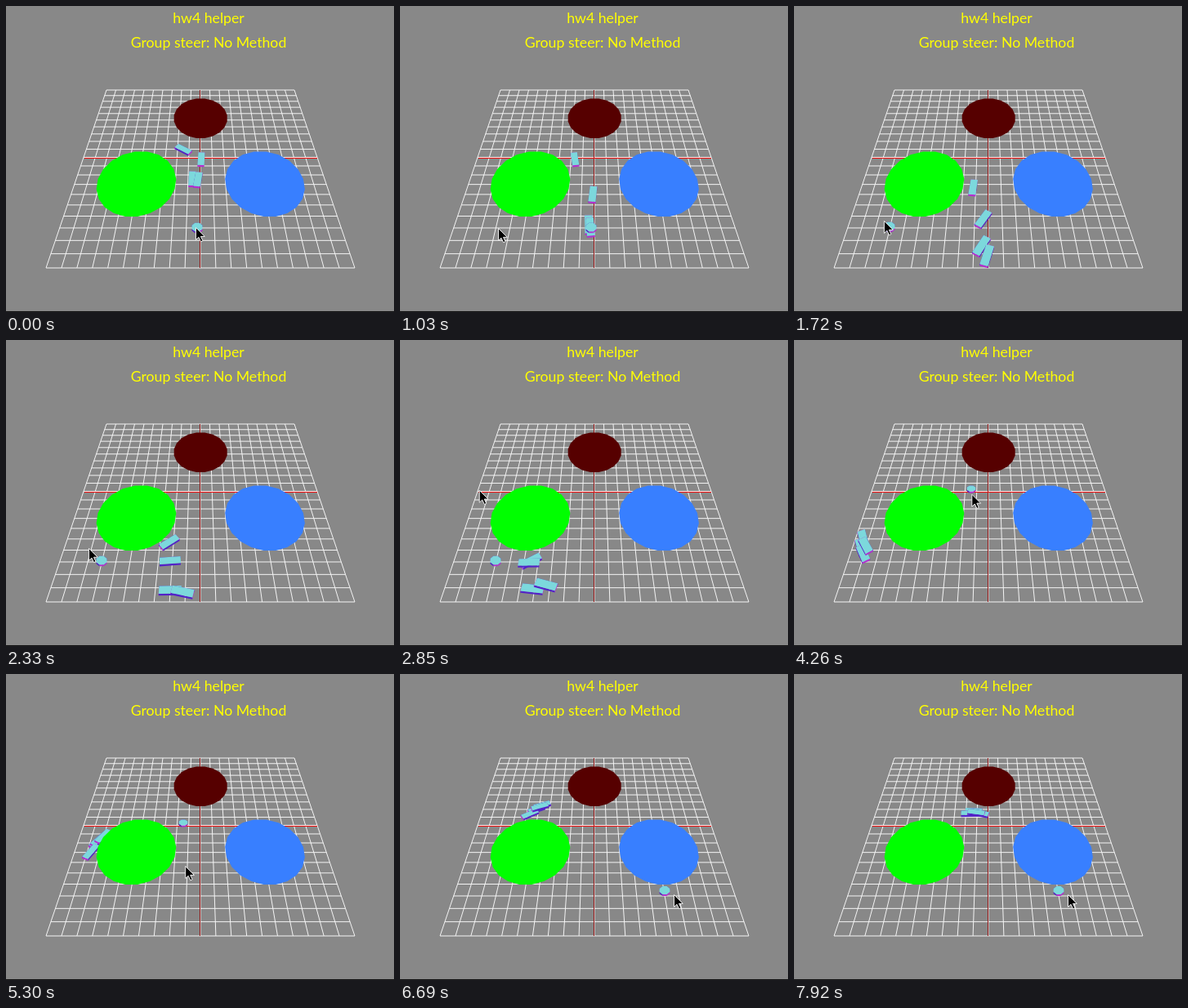
Animation of 475 by 375 pixels, one loop 8000 ms. Source, as an HTML page with a canvas:

```html
<!DOCTYPE html>
<html lang="en">
<head>
<meta charset="utf-8">
<title>hw4 helper</title>
<style>
html, body { margin: 0; width: 100%; height: 100%; overflow: hidden; background: #888; }
canvas { display: block; }
</style>
</head>
<body>
<canvas id="stage" width="475" height="375"></canvas>
<script>
const ctx = document.getElementById('stage').getContext('2d');
const LOOP = 8000;

// Perspective ground plane: x and z run from -10 to 10.
const CENTER = 238, HORIZON = -235.8, SPREAD = 0.03394;
const MID = 0.0023738, STEP = 0.00005778;

function project(x, z) {
  const d = 1 / (MID - z * STEP);
  return [CENTER + SPREAD * d * x, d + HORIZON];
}

function unproject(x, y) {
  const d = y - HORIZON;
  return [(x - CENTER) / (SPREAD * d), (MID - 1 / d) / STEP];
}

// Waypoints in stage pixels; all agents share the same times.
const times = [0, 400, 1030, 1750, 2330, 3370, 4350, 5300, 6690, 7920];
const routeA = [[217,176],[211,173],[214,188],[219,224],[200,248],[121,284],[81,250],[112,205],[167,166],[220,168]];
const routeB = [[239,188],[238,204],[236,231],[231,262],[201,271],[118,270],[84,240],[114,203],[174,161],[228,171]];
const routeC = [[228,212],[227,233],[231,268],[229,295],[201,307],[125,297],[83,258],[104,218],[159,172],[215,171]];
const routeD = [[235,213],[231,235],[233,271],[236,307],[216,309],[140,287],[86,248],[119,199],[171,163],[223,170]];

// Keys: [time, x, y].
const pointer = [
  [0,232,271],[350,205,286],[860,130,282],[1030,120,272],[2330,101,255],[2590,86,206],[3150,109,158],
  [3370,114,157],[3560,114,157],[4180,217,182],[4700,219,225],[5300,219,235],[5850,318,265],[6400,335,270]
];
const targets = [[0,234,272],[1120,117,271],[3150,109,158],[4180,217,183],[5900,324,266]];

function segment(keyTimes, time) {
  let i = 0;
  while (i < keyTimes.length - 2 && time > keyTimes[i + 1]) i++;
  const span = keyTimes[i + 1] - keyTimes[i];
  return [i, span, Math.min(1, (time - keyTimes[i]) / span)];
}

function slope(route, i, axis) {
  const a = Math.max(i - 1, 0), b = Math.min(i + 1, route.length - 1);
  return (route[b][axis] - route[a][axis]) / (times[b] - times[a]);
}

function along(route, time) {
  const [i, span, u] = segment(times, time);
  const a = route[i], b = route[i + 1], u2 = u * u, u3 = u2 * u;
  return [0, 1].map(k =>
    (2 * u3 - 3 * u2 + 1) * a[k] + (u3 - 2 * u2 + u) * span * slope(route, i, k) +
    (3 * u2 - 2 * u3) * b[k] + (u3 - u2) * span * slope(route, i + 1, k));
}

function linear(keys, time) {
  const [i, , u] = segment(keys.map(k => k[0]), time);
  const a = keys[i], b = keys[i + 1];
  return [1, 2].map(k => a[k] + (b[k] - a[k]) * u);
}

function polygon(points, color) {
  ctx.beginPath();
  points.forEach(p => ctx.lineTo(p[0], p[1]));
  ctx.closePath();
  ctx.fillStyle = color;
  ctx.fill();
}

function line(a, b, color) {
  ctx.beginPath();
  ctx.moveTo(...a);
  ctx.lineTo(...b);
  ctx.strokeStyle = color;
  ctx.stroke();
}

function slab(top, height, sideColor) {
  top.forEach((a, i) => {
    const b = top[(i + 1) % top.length];
    polygon([a, b, [b[0], b[1] + height], [a[0], a[1] + height]], sideColor(i));
  });
  polygon(top, '#7cd8dc');
}

function drawGrid() {
  ctx.lineWidth = 1;
  for (let i = -10; i <= 10; i++) {
    line(project(i, -10), project(i, 10), '#f4f4f4');
    line(project(-10, i), project(10, i), '#f4f4f4');
  }
  line([237.5, 103], [237.5, 321], '#991a1a');
  line([96, 186.5], [381, 186.5], '#f01010');
}

function drawAgent(route, time) {
  const t = Math.min(time, 7919);
  const [x, y] = along(route, t), next = along(route, t + 1);
  const [gx, gz] = unproject(x, y - 1), ahead = unproject(next[0], next[1] - 1);
  const angle = Math.atan2(ahead[1] - gz, ahead[0] - gx);
  const c = Math.cos(angle), s = Math.sin(angle);
  const top = [[-1, -1], [1, -1], [1, 1], [-1, 1]].map(([along, across]) => {
    const l = along * 0.75, w = across * 0.28;
    return project(gx + l * c - w * s, gz + l * s + w * c);
  });
  slab(top, 2.3, i => i % 2 ? '#b32fd0' : '#5323c8');
}

function drawTarget(time) {
  const [, x, y] = targets.filter(k => k[0] <= time).pop();
  const k = (y - HORIZON) / 507;
  const top = Array.from({ length: 8 }, (_, i) => {
    const a = (i + 0.5) * Math.PI / 4;
    return [x + 7 * k * Math.cos(a), y - 1 + 5.6 * k * k * Math.sin(a)];
  });
  slab(top, 2, i => i < 2 ? '#b32fd0' : '#5323c8');
}

function drawDisc(x, y, rx, ry, lean, color) {
  const points = Array.from({ length: 20 }, (_, i) => {
    const a = (i + 0.5) * Math.PI / 10;
    return [x + rx * Math.cos(a) + lean * Math.sin(a), y + ry * Math.sin(a)];
  });
  polygon(points, color);
}

function drawPointer(time) {
  const [x, y] = linear(pointer, time);
  const shape = [[0.5, 0.5], [0.5, 15.5], [4, 12.3], [6.6, 17.8], [9, 16.7], [6.5, 11.4], [11.3, 11.4]];
  polygon(shape.map(p => [x + p[0], y + p[1]]), '#000');
  ctx.lineWidth = 1;
  ctx.strokeStyle = '#eee';
  ctx.stroke();
}

function draw(time) {
  ctx.fillStyle = '#888';
  ctx.fillRect(0, 0, 475, 375);
  drawGrid();
  [routeA, routeB, routeC, routeD].forEach(route => drawAgent(route, time));
  drawTarget(time);
  drawDisc(238.2, 137.7, 32.9, 24.6, 0, '#560000');
  drawDisc(159.5, 218.2, 48.5, 40.3, -6, '#00ff00');
  drawDisc(317, 218.2, 48.5, 40.3, 6, '#387fff');
  ctx.fillStyle = '#ffff00';
  ctx.font = '17.7px Lato, sans-serif';
  ctx.textAlign = 'center';
  ctx.fillText('hw4 helper', 248, 21);
  ctx.fillText('Group steer: No Method', 248, 51);
  ctx.fillStyle = '#111';
  ctx.fillRect(0, 374, 475, 1);
  drawPointer(time);
}

const start = performance.now();
function tick() {
  draw((performance.now() - start) % LOOP);
  requestAnimationFrame(tick);
}
tick();
</script>
</body>
</html>
```
